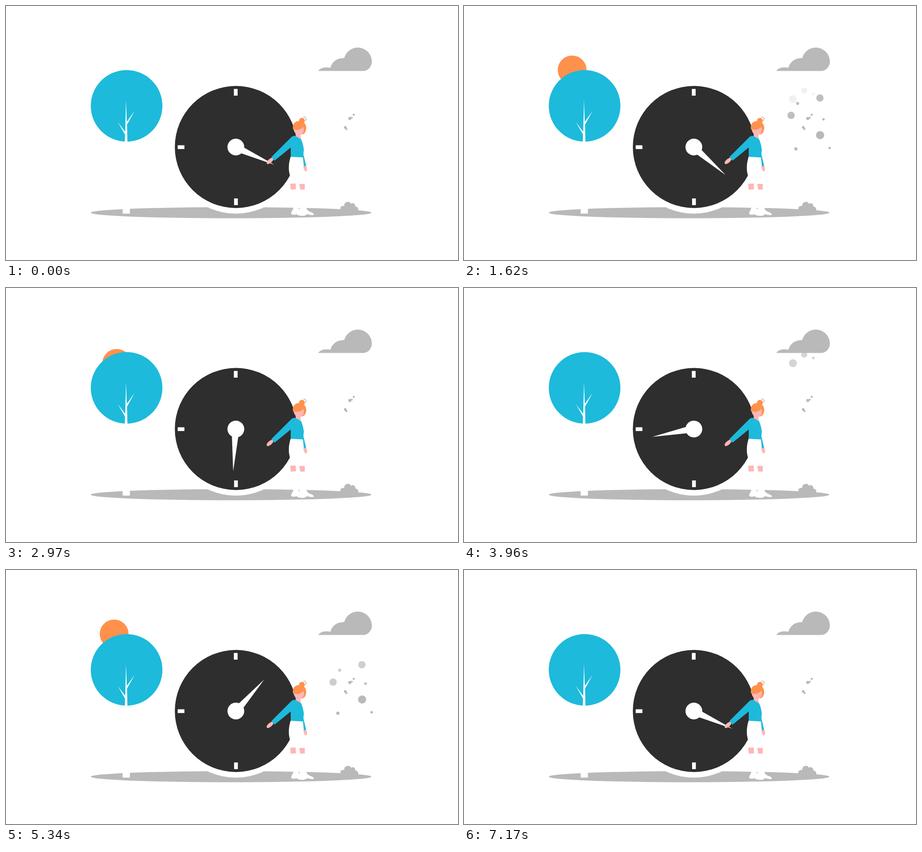
Write an HTML page that moves like this. It is 997 px wide and 561 px high and loops after 7.2 s.

```html
<!DOCTYPE html>
<html lang="en">
<head>
<meta charset="utf-8">
<title>Clock</title>
<style>
  html, body { margin: 0; width: 100%; height: 100%; overflow: hidden; background: #fff; }
  svg { display: block; width: 100%; height: 100%; }
  .gray { fill: #b9b9b9; }
  .dark { fill: #2e2e2e; }
  .blue { fill: #1dbadb; }
  .orange { fill: #ff914d; }
  .skin { fill: #ffb6b6; }
  .white { fill: #fff; }
</style>
</head>
<body>
<svg viewBox="0 0 997 561">
  <circle id="sun" class="orange" r="31.8"/>

  <ellipse class="gray" cx="496.5" cy="456.5" rx="309.5" ry="12.3"/>

  <g id="tree">
    <circle class="blue" cx="266" cy="220.5" r="79"/>
    <path class="white" d="M264.7 207 L266.4 256 L283.5 232 L267 262 L267.8 300 V446 H273.3 V458.5 H257.3 V446 H262 V300 L262.6 284 L246.5 256 L263 278Z"/>
  </g>

  <g id="drops" class="gray">
    <g>
      <circle cx="725.5" cy="166" r="8.7"/>
      <circle cx="750.5" cy="147" r="6.7"/>
      <circle cx="770.5" cy="154.5" r="3"/>
    </g>
    <g>
      <circle cx="721.5" cy="234.3" r="8"/>
      <circle cx="736" cy="208" r="3.4"/>
      <circle cx="785" cy="196" r="8"/>
    </g>
    <g>
      <circle cx="732" cy="315.4" r="3.6"/>
      <circle cx="785.5" cy="285" r="9"/>
      <circle cx="793" cy="250" r="2.7"/>
      <circle cx="806.5" cy="313.4" r="2.7"/>
    </g>
  </g>

  <path id="cloud" class="gray" d="M689 143.5 C693 136 706 134 715.5 136.5 C719 123 731 114.5 746 115 A31 31 0 0 1 807 122.7 C807 134 798 143.5 788 143.5Z"/>

  <g id="specks" class="gray">
    <circle cx="748.3" cy="268.3" r="3"/>
    <circle cx="751" cy="272" r="2.2"/>
    <circle cx="758.3" cy="248.4" r="3.4"/>
    <circle cx="762.8" cy="246.6" r="2.1"/>
    <circle cx="767" cy="240.4" r="2.3"/>
  </g>

  <path id="bush" class="gray" d="M737.5 446 C739 441.5 743 441 746 442 C745 431 760 430 760.5 437 C766 433 771 437 770.5 443 C775 443 778 447 777 452 L738 452Z"/>

  <g id="clock" transform="translate(507 311.5)">
    <circle class="white" r="147"/>
    <circle class="dark" cx=".2" cy="-.1" r="134.8"/>
    <g id="ticks" class="white"></g>
    <g id="hand" class="white">
      <circle r="18.5"/>
      <path d="M14 -6.6 L93.3 0 L14 7.9Z"/>
    </g>
  </g>

  <g id="person">
    <path class="white" d="M628 332 L656 333 C662 348 664 368 661 384 L640 388 L626 377 C626.5 373 624.5 369 624 362 C623.5 350 625 342 628 332Z"/>
    <path class="skin" d="M626.8 392.5 L639 392 L639.5 405 L628 405.5Z M646.8 393 L659 393 L659 405.5 L649 405.5Z"/>
    <path class="white" d="M634 440 H643.5 C645 447 649 451 645 457 C641 462 631 462 629 459 C628.5 453 635 451 634 440Z"/>
    <path class="white" d="M649.5 440 H661 C662 449 666 453 672 455 C678 457 680 460 679 461 C674 463 668 461 664 459.5 C661 465 648 464 641.5 461 C641 456 648 452 649.5 440Z"/>

    <path class="skin" d="M587.5 334.5 C581 337 577 341 575 345 C574.5 349 577 350 580 348.5 C584 347 588 343 590 339Z"/>
    <path class="skin" d="M656 353.5 L662 352.5 C664.5 357 664.5 362 663 365 C659 366 656.5 362 656 353.5Z"/>
    <path class="skin" d="M639 277 H649.5 V288 L651 294 Q645 293 639 288Z"/>
    <path class="blue" d="M630 289 Q634 286.3 638.5 287 L651 294.5 Q655 303 657 317 L656 327 L662 353 L657 354 L655 334.5 L628 333 V312.5 L592.5 341.5 L585.5 333.5Z"/>

    <circle class="orange" cx="652.7" cy="253.3" r="6.3"/>
    <path d="M656 245.5 C662 243.5 664 251 659.5 254" fill="none" stroke="#a4552d" stroke-width=".8"/>
    <path class="orange" d="M633 272 C630.5 258 641 253 649 254 C660 255 664 266 661.5 274 C660 281 656 284 652 283.5 L640 277Z"/>
    <path class="skin" d="M634.5 271.5 C641 276 651 273 655.5 267 C659 273 657 283 649.5 284.5 C641 286 635 280 634.5 271.5Z"/>
  </g>
</svg>
<script>
const LOOP = 7200, HALF = LOOP / 2, STEP = 30;
const byId = id => document.getElementById(id);
const clamp01 = v => Math.min(1, Math.max(0, v));
const bezier = (a, b, s) => 3 * (1 - s) ** 2 * s * a + 3 * (1 - s) * s * s * b + s ** 3;

const hand = byId("hand"), sun = byId("sun"), dropGroups = [...byId("drops").children];

// The fourth tick stays behind the person.
for (const angle of [180, 270, 360]) {
  byId("ticks").innerHTML +=
    `<rect x="-4.4" y="-128.3" width="8.3" height="14.8" transform="rotate(${angle})"/>`;
}

// Slow start, fast middle, soft landing; bisection solves the curve for x.
function ease(x) {
  let low = 0, high = 1;
  for (let i = 0; i < 24; i++) {
    const mid = (low + high) / 2;
    if (bezier(.66, .595, mid) < x) low = mid; else high = mid;
  }
  return bezier(0, .985, low);
}

function drawHand(progress) {
  hand.setAttribute("transform", `rotate(${24.7 + 360 * ease(progress)})`);
}

// The sun is highest in the middle of its cycle and sinks behind the tree.
function drawSun(phase) {
  const sink = Math.min(60, 13.5 * (Math.abs(phase - HALF / 2) / 990) ** 3.75);
  sun.setAttribute("transform", `translate(${238.5 + sink * .225} ${141.2 + sink})`);
}

// Each group fades in a little after the last one, then falls and fades out.
function drawDrops(phase) {
  dropGroups.forEach((group, i) => {
    const age = phase - 400 * i;
    const fall = 9.9 * (Math.max(0, age - 600) / 680) ** 3.43;
    group.setAttribute("transform", `translate(0 ${fall})`);
    group.setAttribute("opacity", Math.min(clamp01(age / 600), clamp01((1720 - age) / 540)));
  });
}

function draw(time) {
  const t = Math.floor((time % LOOP) / STEP) * STEP;
  drawHand(t / LOOP);
  drawSun(t % HALF);
  drawDrops(t % HALF);
}

const start = performance.now();
function tick() {
  draw(performance.now() - start);
  requestAnimationFrame(tick);
}
tick();
</script>
</body>
</html>
```
